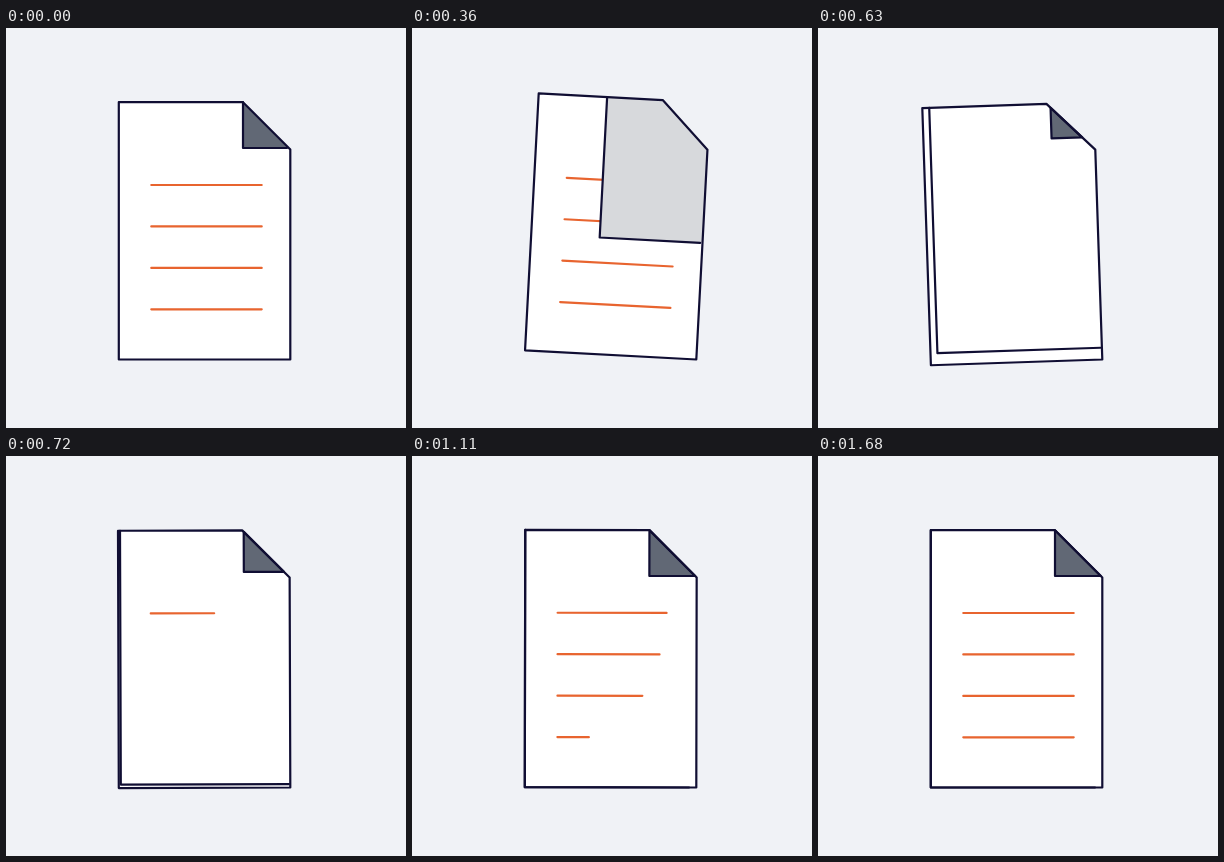
An HTML page that plays this animation: 400 px wide and 400 px high, repeating every 4.4 s.

```html
<!DOCTYPE html>
<html lang="en">
<head>
<meta charset="utf-8">
<title>Page turn</title>
<style>
  html, body { margin: 0; width: 100%; height: 100%; overflow: hidden; background: #f0f2f6; }
  svg { display: block; width: 100%; height: 100%; }
  path { fill: none; stroke-width: 2.2; stroke-linecap: round; stroke-linejoin: round; }
  .ink { stroke: #100e33; }
  .text { stroke: #e8642f; }
</style>
</head>
<body>
<svg viewBox="0 0 400 400">
  <g id="page">
    <path d="M112.8 74.2H237L284.3 121.5V331.5H112.8Z" style="fill:#fff"/>
    <path id="oldText" class="text"/>
    <path id="sheet"/>
    <path id="edge" class="ink"/>
    <path id="newText" class="text"/>
    <path id="fold" class="ink" style="fill:#616875"/>
    <path class="ink" d="M112.8 74.2H237L284.3 121.5V331.5H112.8Z"/>
  </g>
</svg>
<script>
const LOOP = 4400, STEP = 30, END = 1680;
const LEFT = 112.8, TOP = 74.2, RIGHT = 284.3, BOTTOM = 331.5;
const LINES = 4, LINE_X = 145.3, LINE_W = 110.4;

// Time in ms and tilt in degrees.
const TILT = [[0, 0], [228, 7], [535, -3], [720, -0.18], [848, 2],
              [960, 1.35], [1110, 0.1], [1160, 0]];

const el = id => document.getElementById(id);
const clamp = v => Math.min(1, Math.max(0, v));
const mix = (a, b, k) => a + (b - a) * k;
const span = (t, start, length) => clamp((t - start) / length);
const setPath = (id, d) => el(id).setAttribute('d', d);

function bezier(x1, y1, x2, y2) {
  const at = (a, b, s) => 3 * a * s * (1 - s) ** 2 + 3 * b * s * s * (1 - s) + s ** 3;
  return u => {
    if (u <= 0 || u >= 1) return clamp(u);
    let lo = 0, hi = 1;
    for (let i = 0; i < 24; i++) {
      const mid = (lo + hi) / 2;
      if (at(x1, x2, mid) < u) lo = mid; else hi = mid;
    }
    return at(y1, y2, lo);
  };
}
const drawEase = bezier(0, 0.7, 0.4, 1);
const turnEase = bezier(0.2, 0.7, 0.4, 1);

// Monotone cubic through the keys, flat at every peak.
function tiltAt(t) {
  const rate = i => (TILT[i + 1][1] - TILT[i][1]) / (TILT[i + 1][0] - TILT[i][0]);
  const slope = i => {
    if (i === 0 || i === TILT.length - 1) return 0;
    const a = rate(i - 1), b = rate(i);
    return a * b > 0 ? 2 * a * b / (a + b) : 0;
  };
  const i = TILT.findIndex((k, n) => n + 1 < TILT.length && t < TILT[n + 1][0]);
  if (i < 0) return 0;
  const [t0, a] = TILT[i], [t1, b] = TILT[i + 1];
  const h = t1 - t0, u = (t - t0) / h, v = 1 - u;
  return a * (1 + 2 * u) * v * v + b * u * u * (3 - 2 * u)
       + h * u * v * (slope(i) * v - slope(i + 1) * u);
}

function textPath(amount) {
  let d = '';
  for (let i = 0; i < LINES; i++) {
    const k = amount(i);
    if (k > 0) d += `M${LINE_X} ${157 + 41.45 * i}h${LINE_W * k}`;
  }
  return d;
}

function render(t) {
  el('page').setAttribute('transform', `rotate(${tiltAt(t)} ${RIGHT} ${BOTTOM})`);

  // The folded corner opens out into a fresh sheet.
  const turn = turnEase(span(t, 271, 575));
  const x = mix(237, LEFT, turn), y = mix(120, BOTTOM, turn);
  const tip = 281 + 2 * turn - 6 * span(t, 730, 150);
  const white = clamp(turn / 0.6);
  const shade = [97, 104, 117].map(c => Math.round(mix(c, 255, white)));
  setPath('sheet', `M${x} ${TOP}V${y}H${RIGHT}V121.5L237 ${TOP}Z`);
  el('sheet').style.fill = `rgb(${shade})`;
  setPath('edge', `M${x} ${TOP}V${y}H${tip}`);

  setPath('newText', textPath(i => drawEase(span(t, 645 + 150 * i, 585))));

  const size = drawEase(span(t, 560, 370));
  const fx = mix(249, 237, size), fy = mix(86.2, TOP, size), side = 45.8 * size;
  setPath('fold', size > 0 ? `M${fx} ${fy}v${side}h${side}Z` : '');
}

setPath('oldText', textPath(() => 1));

const start = performance.now();
function tick() {
  const t = (performance.now() - start) % LOOP;
  render(Math.min(END, Math.floor(t / STEP) * STEP));
  requestAnimationFrame(tick);
}
tick();
</script>
</body>
</html>
```
